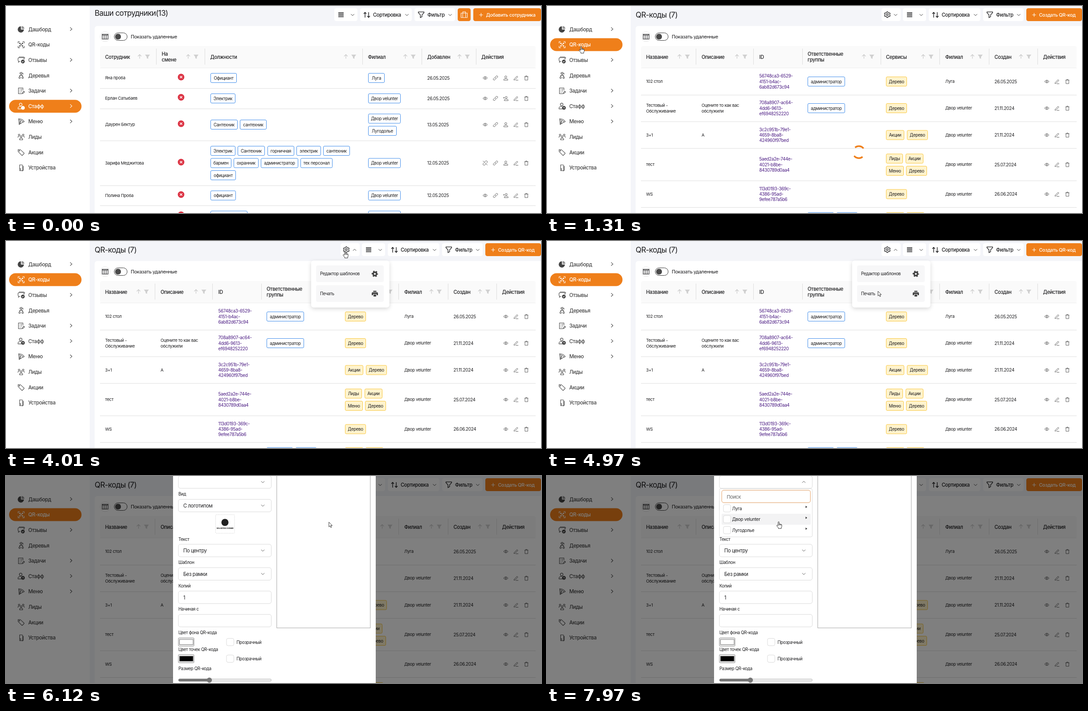
These frames come from a looping animation (1201x466 px, 8000 ms). An HTML page:

```html
<!DOCTYPE html>
<html lang="ru">
<head>
<meta charset="utf-8">
<title>Панель</title>
<style>
html, body { margin: 0; width: 100%; height: 100%; overflow: hidden; background: #f4f5f9; }
svg { display: block; width: 1201px; height: 466px; }
text { font-family: Inter, "Open Sans", sans-serif; letter-spacing: -.035em; }
</style>
</head>
<body>
<svg id="stage" viewBox="0 0 1201 466" xmlns="http://www.w3.org/2000/svg"></svg>
<script>
const LOOP = 8000, ORANGE = '#ef7f1a', INK = '#1c1c1e';
const BRANCH = ['Луга', 'Двор velunter', 'Лугодолье'];
const T = { click1: 1140, page: 1290, loaded: 1670, click2: 3200, menu: 3300,
            click3: 4840, modal: 5000, ready: 5330, click4: 6790, list: 6920, row: 7880 };

// y is the vertical middle of the capitals
const text = (x, y, s, size = 9.8, fill = INK, weight = 400, anchor = 'start') =>
  `<text x="${x}" y="${y + size * .364}" font-size="${size}" fill="${fill}" font-weight="${weight}" text-anchor="${anchor}">${s}</text>`;
const lines = (x, y, list, gap = 12.2, size, fill, weight) =>
  list.map((s, i) => text(x, y + (i - (list.length - 1) / 2) * gap, s, size, fill, weight)).join('');
const rect = (x, y, w, h, r, fill, stroke = 'none', extra = '') =>
  `<rect x="${x}" y="${y}" width="${w}" height="${h}" rx="${r}" fill="${fill}" stroke="${stroke}" ${extra}/>`;
const group = (id, body, extra = '') => `<g id="${id}" ${extra}>${body}</g>`;
const line = (d, color, w = 1) => `<path d="${d}" fill="none" stroke="${color}" stroke-width="${w}"/>`;

const dot = (x, y, r, fill = 'none') => `<circle cx="${x}" cy="${y}" r="${r}" fill="${fill}"/>`;
const p = (d, fill = 'none') => `<path d="${d}" fill="${fill}"/>`;
const CUR = 'currentColor';
const ICONS = {
  pie: p('M-1-6A6.4 6.4 0 1 0 5.6 1.2H-1Z', CUR) + `<g opacity=".55">${p('M1.6-6.6A5.6 5.6 0 0 1 6.6-1.4H1.6Z', CUR)}</g>`,
  scan: p('M-6.8-3V-6.8H-3M3-6.8H6.8V-3M6.8 3V6.8H3M-3 6.8H-6.8V3M-2.4-2.4L2.4 2.4M2.4-2.4L-2.4 2.4') +
    [[-3, -3], [3, -3], [-3, 3], [3, 3]].map(([x, y]) => dot(x, y, 1, CUR)).join(''),
  chat: p('M-2 3H-4L-6 5V2Q-7 1-7 0V-3Q-7-5.5-4.5-5.5H4Q6.5-5.5 6.5-3V-1M-5-7H5Q8-7 8-4') +
    dot(3.8, 3.3, 3.6, CUR) + `<path d="M2.2 3.3l1.2 1.2 2-2.2" fill="none" stroke="#fff"/>`,
  tree: dot(0, -5, 2) + dot(-3.4, 5, 1.8) + dot(3.4, 5, 1.8) + p('M0-3V0M-3.4 3V0H3.4V3M-3-5H-4M3-5H4V-2'),
  task: p('M4-1V-6.5H-6V6.5H1M-4-3.5H-3M-1.5-3.5H2M-4 0H-3M-1.5 0H2M-4 3.5H-3M-1.5 3.5H0M2 6.5l.6-2.3L6 .8l1.6 1.6L4.2 5.8Z'),
  staff: dot(-1, -4, 3) + p('M1 6H-7V4Q-6.5.8-3 .8H0') + dot(4, 3.6, 3.7, CUR) + `<path d="M4 1.6V3.8H5.8" fill="none" stroke="#fff"/>`,
  pizza: p('M-5.5-6.5Q3-6 7 0Q5.5 1.2 4 1L-4.5 6.5Z M-4.8-4Q1-3.5 4 1') + dot(-2, 0, .9, CUR) + dot(-2.6, 3, .8, CUR),
  leads: dot(0, -1, 1.9) + dot(-4.6, -4.6, 1.8) + dot(4.6, -4.6, 1.8) +
    p('M-3.5 6.3V5Q-3.3 2.6 0 2.6T3.5 5V6.3ZM-7.3 1V0Q-7-1.5-4.5-1.5M7.3 1V0Q7-1.5 4.5-1.5'),
  tag: p('M-6.8-2V-6.4H-2L6.6 1.4Q7 2 6.6 2.6L2.6 6.6Q2 7 1.4 6.6Z') + dot(-4, -3.7, .8, CUR),
  phone: p('M-3.4-6.5H2Q3.4-6.5 3.4-5V5Q3.4 6.5 2 6.5H-1V2H-3.4ZM-3.4 2V6.5H-1M4.8-4V5Q4.6 7 2.5 7.3'),
  right: p('M-2-3.8L2 0L-2 3.8'),
  down: p('M-3.6-1.8L0 1.8L3.6-1.8'),
  up: p('M0 4.5V-4.5M-4-.8L0-4.7L4-.8'),
  funnel: p('M-5.6-4.6H5.6L1.7.4V4.8L-1.7 3.4V.4Z', CUR),
  filter: p('M-6.4-6.2H6.4V-4.5L1.8.6V4.6L-1.8 6.6V.6L-6.4-4.5Z'),
  sort: p('M-4 6V-5.6M-7-2.6L-4-5.8L-1-2.6M4-6V5.6M1 2.6L4 5.8L7 2.6'),
  bars: p('M-6-4.6H6M-6-1.5H6M-6 1.6H6M-6 4.7H6'),
  gear: dot(0, 0, 2.1) + p('M-1.3-6.4H1.3L1.8-4.5L3.4-3.6L5.2-4.2L6.5-2L5.1-.7V.7L6.5 2L5.2 4.2L3.4 3.6L1.8 4.5L1.3 6.4H-1.3L-1.8 4.5L-3.4 3.6L-5.2 4.2L-6.5 2L-5.1.7V-.7L-6.5-2L-5.2-4.2L-3.4-3.6L-1.8-4.5Z'),
  cols: p('M-6.5-5.5H6.5V5.5H-6.5ZM-6.5-3.5H6.5M-2.2-3.5V5.5M2.2-3.5V5.5'),
  bag: p('M-7-4H7V6H-7ZM-3-4V-7H3V-4M-3.2-4V6M3.2-4V6'),
  plus: p('M-4.2 0H4.2M0-4.2V4.2'),
  eye: p('M-5 0Q0-6.4 5 0Q0 6.4-5 0Z') + dot(0, 0, 1.6),
  link: p('M-.9 1.2Q-2.2-.6-.8-2L1.4-4.2Q3-5.4 4.4-4.2T4.4-1.2L3 .2M.9-1.2Q2.2.6.8 2L-1.4 4.2Q-3 5.4-4.4 4.2T-4.4 1.2L-3-.2'),
  unlink: p('M-1.5-2.6L1-4.5Q3-5.4 4.4-4.2T4.4-1.2L2.6.6M1.5 2.6L-1 4.5Q-3 5.4-4.4 4.2T-4.4 1.2L-2.6-.6M-5-4.8L5 4.8'),
  user: dot(0, -2.3, 2.3) + p('M-4.6 5V3.8Q-4 1.6-1.5 1.6H1.5Q4 1.6 4.6 3.8V5Z'),
  invite: dot(1, -2.3, 2.2) + p('M-3.4 5V3.8Q-3 1.6-.5 1.6H2.5Q4.8 1.6 5.4 3.8V5ZM-5.6-1.4H-2.6M-4.1-2.9V.1'),
  pen: p('M-4.4 2.6L2.2-4.2L4-2.4L-2.6 4.2L-4.8 4.6ZM-1 5H5'),
  trash: p('M-4.4-3H4.4M-1.6-3V-4.6H1.6V-3M-3.2-3V4.8H3.2V-3')
};
const icon = (name, x, y, color = '#333', w = 1, extra = '') =>
  `<g transform="translate(${x} ${y})" color="${color}" stroke="${color}" stroke-width="${w}" fill="none"><g ${extra}>${ICONS[name]}</g></g>`;

const tag = (x, y, w, s, warm) =>
  rect(x + .5, y - 10.5, w - 1, 21, 2.5, warm ? '#fff3cd' : '#fff', warm ? '#f9c73c' : '#3d8bea') +
  text(x + w / 2, y, s, 9.7, INK, 400, 'middle');

const button = (x, w, fill = '#fff') => rect(x, 5, w, 29, 4.5, fill);
const tools = dx =>
  button(737 + dx, 52) + icon('bars', 752 + dx, 19.5, INK, 1.5) + icon('down', 778 + dx, 20) +
  button(795 + dx, 116) + icon('sort', 810 + dx, 20, INK, 1.4) + text(824 + dx, 20, 'Сортировка', 11.2, INK, 500) + icon('down', 900 + dx, 20) +
  button(917 + dx, 91) + icon('filter', 932 + dx, 19.5, INK, 1.3) + text(946 + dx, 20, 'Фильтр', 11.2, INK, 500) + icon('down', 997 + dx, 20);
const create = (x, s) => button(x, 1201 - x, ORANGE) + icon('plus', x + 17.5, 20, '#fff', 1.1) + text(x + 28.5, 20, s, 10.9, '#fff', 500);

// columns: [text x, title lines, sort icon x, right divider x]
const table = (cols, rules) =>
  rect(199, 45, 1010, 440, 6, '#fff') +
  `<circle cx="222.5" cy="69" r="11" fill="#fff" stroke="#e6e6e6"/>` + icon('cols', 222.5, 69, INK, 1.2) +
  rect(243, 60.5, 29, 17, 8.5, '#fff', '#333') + dot(251.5, 69, 6.6, '#4a4a4a') +
  text(280, 69, 'Показать удаленные', 10.9) +
  rect(211, 90, 978, 50, 5, '#fafafa') +
  cols.map(([x, title, sx, div]) => lines(x, 114.5, title, 13.5, 11.1, INK, 500) +
    (sx ? icon('up', sx, 114, '#c9c9c9', 1.2) + icon('funnel', sx + 17.6, 114, '#cfcfcf', 0) : '') +
    (div ? line(`M${div} 96V132`, '#dcdcdc') : '')).join('') +
  line('M211 139.5H1189', '#eee') + rules.map(y => line(`M211 ${y}H1189`, '#dedede')).join('');
const actions = (names, x, y) => names.map((n, i) => icon(n, x + i * 23.1, y, '#444', .85)).join('');

function staffPage() {
  const jobs = [
    [162, [459, 59, 'Официант']], [208, [459, 56, 'Электрик']],
    [267, [459, 61, 'Сантехник'], [525, 60, 'сантехник']],
    [326, [459, 56, 'Электрик'], [520, 61, 'Сантехник'], [587, 60, 'горничная'], [652, 55, 'электрик'], [712, 60, 'сантехник']],
    [353.5, [459, 47, 'бармен'], [511, 56, 'охранник'], [572, 84, 'администратор'], [661, 72, 'тех персонал']],
    [381, [459, 57, 'официант']], [426.5, [459, 57, 'официант']], [472, [459, 83, 'администратор']]
  ];
  const people = [
    [162, 'Яна проба', '26.05.2025', 'eye', 'user'], [208, 'Ерлан Сатыбаев', '26.05.2025', 'eye', 'invite'],
    [267, 'Даурен Бектур', '13.05.2025', 'eye', 'user'], [353.5, 'Зарифа Меджитова', '12.05.2025', 'unlink', 'user'],
    [426.5, 'Полина Проба', '12.05.2025', 'eye', 'invite']
  ];
  const cross = y => dot(393, y, 7.4, '#dc3545') + line(`M390.4 ${y - 2.6}l5.2 5.2m0-5.2l-5.2 5.2`, '#fff', 1.4);
  return text(199, 16, 'Ваши сотрудники(13)', 17, INK, 400) + tools(0) +
    button(1014, 29, ORANGE) + icon('bag', 1028.5, 20, '#fff', 1.1) + create(1049, 'Добавить сотрудника') +
    table([[222.5, ['Сотрудник'], 300, 337.5], [349.5, ['На', 'смене'], 409, 446.5], [458.5, ['Должности'], 763, 800.5],
      [812.5, ['Филиал'], 896.5, 933.5], [945.5, ['Добавлен'], 1018, 1055.5], [1067, ['Действия']]], [185.5, 231.5, 303.5, 404.5, 449.5]) +
    people.map(([y, name, date, a, b]) => text(222.5, y, name, 9.6) + text(945.5, y, date, 10) +
      actions([a, 'link', b, 'pen', 'trash'], 1075.7, y)).join('') +
    [160, 205.5, 265, 351.5, 424.5, 470].map(cross).join('') +
    jobs.map(([y, ...row]) => row.map(([x, w, s]) => tag(x, y, w, s)).join('')).join('') +
    tag(813, 162, 37, BRANCH[0]) + tag(813, 281, 64, BRANCH[2]) +
    [208, 253.5, 353.5, 426.5, 472].map(y => tag(813, y, 73, BRANCH[1])).join('');
}

function codesPage() {
  const rows = [
    [170, ['102 стол'], [], '56748ca3-6529- 4151-b4ac- 6ab82d673c94', 0, '26.05.2025'],
    [230, ['Тестовый -', 'Обслуживание'], ['Оцените то как вас', 'обслужили'], '708a8907-ac64- 4dd6-9613- ef6948252220', 1, '21.11.2024'],
    [290.5, ['3+1'], ['А'], '3c2c951b-79e1- 4659-8ba8- 424960f97bed', 1, '21.11.2024'],
    [357, ['тест'], [], '5aed2a2e-744e- 4021-b8be- 8430789d0aa4', 1, '25.07.2024'],
    [423.5, ['WS'], [], '113d0193-369c- 4386-95ad- 9efee787a5b6', 1, '26.06.2024']
  ];
  const services = [[761, 170, 47, 'Дерево'], [761, 230, 47, 'Дерево'], [761, 290.5, 41, 'Акции'], [808, 290.5, 47, 'Дерево'],
    [761, 343.5, 38, 'Лиды'], [805, 343.5, 40, 'Акции'], [761, 371, 40, 'Меню'], [806, 371, 47, 'Дерево'], [761, 423.5, 47, 'Дерево'],
    [761, 475.5, 41, 'Акции'], [807, 475.5, 40, 'Лиды']];
  return text(199, 20, 'QR-коды (7)', 17, INK, 400) +
    button(751, 43) + icon('gear', 764, 19.5, INK, 1.2) + `<g id="gearArrow">${icon('down', 782.5, 20)}</g>` +
    tools(62) + create(1076, 'Создать QR-код') +
    table([[222.5, ['Название'], 297.5, 334.5], [347, ['Описание'], 426.5, 463.5], [476.5, ['ID'], 0, 573.5],
      [585, ['Ответственные', 'группы'], 711.5, 749.5], [761, ['Сервисы'], 844.5, 881.5], [894, ['Филиал'], 955, 992.5],
      [1004.5, ['Создан'], 1064, 1101.5], [1113.5, ['Действия']]], [200.5, 260.5, 320.5, 393.5, 453.5]) +
    rows.map(([y, name, note, id, b, date]) => lines(222.5, y, name, 12.2, 9.6) + lines(347, y, note, 12.2, 9.6) +
      lines(476.5, y, id.split(' '), 12.2, 9.9, '#4a1a82') + text(894, y, BRANCH[b], 9.6) + text(1004.5, y, date, 10) +
      actions(['eye', 'pen', 'trash'], 1122, y)).join('') +
    tag(585, 170, 84, 'администратор') + tag(585, 230, 84, 'администратор') +
    tag(585, 475.5, 59, 'Официант') + tag(650, 475.5, 47, 'бармен') +
    services.map(([x, y, w, s]) => tag(x, y, w, s, true)).join('');
}

const ITEMS = [['pie', 'Дашборд', 1], ['scan', 'QR-коды'], ['chat', 'Отзывы', 1], ['tree', 'Деревья'], ['task', 'Задачи', 1],
  ['staff', 'Стафф', 1], ['pizza', 'Меню', 1], ['leads', 'Лиды'], ['tag', 'Акции'], ['phone', 'Устройства']];
const itemY = i => 52.4 + i * 34.65;
const sidebar = () => rect(0, 0, 188, 466, 0, '#fff') + rect(7, 0, 162.5, 29, 14.5, ORANGE, 'none', 'id="pill"') +
  ITEMS.map(([ic, s, more], i) => group('item' + i, icon(ic, 34, itemY(i), CUR, 1.1) +
    text(50, itemY(i), s, 11.5, CUR, 500) + (more ? icon('right', 146, itemY(i) - .5, CUR, 1.1) : ''))).join('');

const menu = () => rect(685, 44, 175.5, 105.5, 6, '#fff', 'none', 'filter="url(#shade)"') +
  rect(696, 55, 152, 37.5, 4, '#f7f7f8') + rect(696, 99.5, 152, 37.5, 4, '#f7f7f8') +
  text(705, 73.5, 'Редактор шаблонов', 9.7) + text(705, 118.5, 'Печать', 9.7) +
  `<g transform="translate(828 74)" fill="none" stroke="#444">${dot(0, 0, 3.8)}<circle r="3.8" stroke-width="3.4"/>` +
  `<circle r="6" stroke-width="2.4" stroke-dasharray="3.2 3.083" stroke-dashoffset="1.6"/></g>` +
  `<path d="M824.5 112h7v2.6h-7zM823 115.5h10q2 0 2 2v4.5h-3v-2.5h-8v2.5h-3v-4.5q0-2 2-2zM825 120.5h6v4.5h-6z" fill="#444"/>`;

const field = (y, s, arrow = true, id = '') => rect(387, y, 208.5, 28.2, 4.5, '#fff', '#d9d9d9', id) +
  text(398, y + 14.5, s, 11.2) + (arrow ? icon('down', 576.5, y + 14, '#555') : '');
const check = (x, y) => rect(x, y, 16.5, 16.5, 3.5, '#fff', '#d9d9d9');
const swatch = (y, fill) => rect(387, y, 35, 18.5, 1.5, '#f0f0f0', '#8a8a8a') + rect(389.5, y + 3.5, 30.5, 11.5, 0, fill, '#777');
function modal() {
  const labels = [[40.5, 'Вид'], [142, 'Текст'], [194.5, 'Шаблон'], [247, 'Копий'], [299.5, 'Начиная с'],
    [352.5, 'Цвет фона QR-кода'], [390.5, 'Цвет точек QR-кода'], [433, 'Размер QR-кода']];
  return rect(0, 0, 1201, 466, 0, 'rgba(0,0,0,.5)') + rect(375, -10, 455, 490, 0, '#fff') +
    rect(607.8, -5, 210, 347, 0, '#fff', '#a3a3a3') +
    labels.map(([y, s]) => text(387, y, s, 9.7)).join('') +
    field(-.5, '', false, 'id="pick"') + `<g id="pickArrow">${icon('down', 576.5, 13.5, '#555')}</g>` +
    field(52.5, 'С логотипом') + field(153.7, 'По центру') + field(206.3, 'Без рамки') +
    field(259, '1', false) + field(311.5, '', false) +
    rect(470.5, 87, 42.5, 42, 2, '#fff', '#d5d5d5', 'stroke-dasharray="2 1.5"') +
    dot(491.5, 104.5, 8, '#222') + text(491.5, 118, 'VELUNTER.CORNER', 4.1, '#111', 700, 'middle') +
    swatch(364.5, '#fff') + swatch(402, '#000') +
    check(495, 365.5) + check(495, 403) + text(517.5, 374, 'Прозрачный', 9.7) + text(517.5, 411.5, 'Прозрачный', 9.7) +
    rect(387.5, 457, 208, 5, 2.5, '#efefef', '#b5b5b5') + rect(387, 456.5, 70, 6, 3, '#757575') + dot(456.5, 459.5, 5.8, '#757575');
}

const list = () => rect(387, 28.5, 208.5, 108.5, 3, '#fff', '#dcdcdc') +
  rect(392, 85, 200, 24.8, 2, '#f3f3f4', 'none', 'id="row"') +
  rect(392.3, 32, 199, 28, 4.5, '#fff', '#d9d9d9') + rect(392.3, 32, 199, 28, 4.5, 'none', '#f0a868', 'id="search"') +
  text(403.5, 46.5, 'Поиск', 11, '#666') +
  BRANCH.map((s, i) => check(396, 64.5 + i * 24.5) + text(415.5, 73 + i * 24.5, s, 10.1) +
    `<path d="M580.5 ${67 + i * 24.5}l3.6 2.6-3.6 2.6z" fill="#333"/>`).join('');

const stage = document.getElementById('stage');
stage.innerHTML =
  '<defs><filter id="shade" x="-20%" y="-20%" width="140%" height="150%"><feDropShadow dx="0" dy="3" stdDeviation="5" flood-opacity=".16"/></filter></defs>' +
  rect(0, 0, 1201, 466, 0, '#f4f5f9') + group('staff', staffPage()) + group('codes', codesPage()) + sidebar() +
  group('menu', menu()) + group('modal', modal()) + group('list', list()) +
  group('spin', line('M-9.5-9.5A13.4 13.4 0 0 1 9.5-9.5M9.5 9.5A13.4 13.4 0 0 1-9.5 9.5', ORANGE, 3.6)) +
  group('ring', dot(0, 0, 9.6, '#ffe838'), 'opacity=".9"') +
  group('arrow', p('M0 0V10.6L2.5 8.4L4.2 12.2L6 11.4L4.3 7.7H7.6Z', '#fff'), 'stroke="#222" stroke-width=".9"') +
  group('hand', p('M-1.2 9V1.2Q-1.1 0 0 0T1.2 1.2V5Q2.4 4.4 3.2 5.5Q4.4 4.9 5.2 6Q7 5.6 7 7.4V10.5Q6.8 12 6 13V15.2H-.6V13.6L-4.2 9.4Q-4.8 8-3.6 7.6Q-2.6 7.4-1.2 9ZM1.2 5V8M3.2 5.5V8M5.2 6V8', '#fff'), 'stroke="#222" stroke-width=".95" stroke-linejoin="round"');

const el = {};
stage.querySelectorAll('[id]').forEach(n => el[n.id] = n);
const show = (n, on) => n.setAttribute('visibility', on ? 'visible' : 'hidden');
const set = (n, k, v) => n.setAttribute(k, v);
const move = (n, x, y, more = '') => set(n, 'transform', `translate(${x.toFixed(2)} ${y.toFixed(2)}) ${more}`);
const ramp = (t, a, d) => Math.min(1, Math.max(0, (t - a) / d));
const smooth = k => k * k * (3 - 2 * k);

const PATH = [[190, 985, 470], [780, 76.5, 91], [1920, 76.5, 91], [1950, 77, 92], [2110, 77, 92], [2250, 106, 71],
  [2710, 737.5, 62], [2890, 761, 27], [2930, 761, 27], [3000, 761, 23], [4010, 761, 23], [4260, 743, 113],
  [5970, 743, 113], [6760, 553, 17], [6990, 553, 17], [7540, 520, 103]];
function pointer(t) {
  const i = PATH.findIndex(k => k[0] > t);
  if (i === 0) return PATH[0].slice(1);
  if (i < 0) return PATH[PATH.length - 1].slice(1);
  const [t0, x0, y0] = PATH[i - 1], [t1, x1, y1] = PATH[i], k = smooth((t - t0) / (t1 - t0));
  return [x0 + (x1 - x0) * k, y0 + (y1 - y0) * k];
}

function draw(t) {
  const [x, y] = pointer(t);
  const codes = t >= T.page, dialog = t >= T.modal, opened = t >= T.list;
  const active = codes ? 1 : 5;
  const hover = x > 7 && x < 170 ? Math.round((y - itemY(0)) / 34.65) : -1;
  show(el.staff, !codes);
  show(el.codes, codes);
  move(el.pill, 0, itemY(active) - 14.5);
  ITEMS.forEach((_, i) => {
    el['item' + i].style.color = i === active ? '#fff' : i === hover ? ORANGE : '#444';
  });

  const pop = 1 - (1 - ramp(t, T.menu, 200)) ** 3, menuOn = t >= T.menu && !dialog;
  show(el.menu, menuOn);
  set(el.menu, 'opacity', pop);
  const s = .8 + .2 * pop;
  move(el.menu, 772 * (1 - s), 40 * (1 - s), `scale(${s})`);
  set(el.gearArrow, 'transform', menuOn ? `rotate(${180 * pop} 782.5 20)` : '');

  show(el.modal, dialog);
  const onPick = dialog && y < 28.5 && x > 387 && x < 596;
  set(el.pick, 'stroke', onPick && !opened ? '#ee9a55' : '#d9d9d9');
  const drop = smooth(ramp(t, T.list, 180));
  show(el.list, opened);
  set(el.list, 'opacity', drop);
  move(el.list, 0, 28 * (1 - (.8 + .2 * drop)), `scale(1 ${.8 + .2 * drop})`);
  set(el.pickArrow, 'transform', `rotate(${180 * drop} 576.5 13.5)`);
  const lit = ramp(t, T.row, 80);
  set(el.row, 'opacity', lit);
  set(el.search, 'opacity', lit);

  const load1 = t >= T.page && t < T.loaded, load2 = dialog && t < T.ready;
  show(el.spin, load1 || load2);
  const turn = (t - (load2 ? T.modal : T.page)) * .3;
  move(el.spin, load2 ? 602.3 : 700, load2 ? 237 : 329, `rotate(${turn})`);

  show(el.ring, [T.click1, T.click2, T.click3, T.click4].some(c => t >= c && t < c + 110));
  move(el.ring, x, y + .5);
  const hand = hover >= 0 || onPick || (!dialog && x > 751 && x < 794 && y < 34) || (opened && y > 61);
  show(el.hand, hand);
  show(el.arrow, !hand);
  move(el.hand, x, y);
  move(el.arrow, x, y);
}

function tick() {
  draw(performance.now() % LOOP);
  requestAnimationFrame(tick);
}
tick();
</script>
</body>
</html>
```
